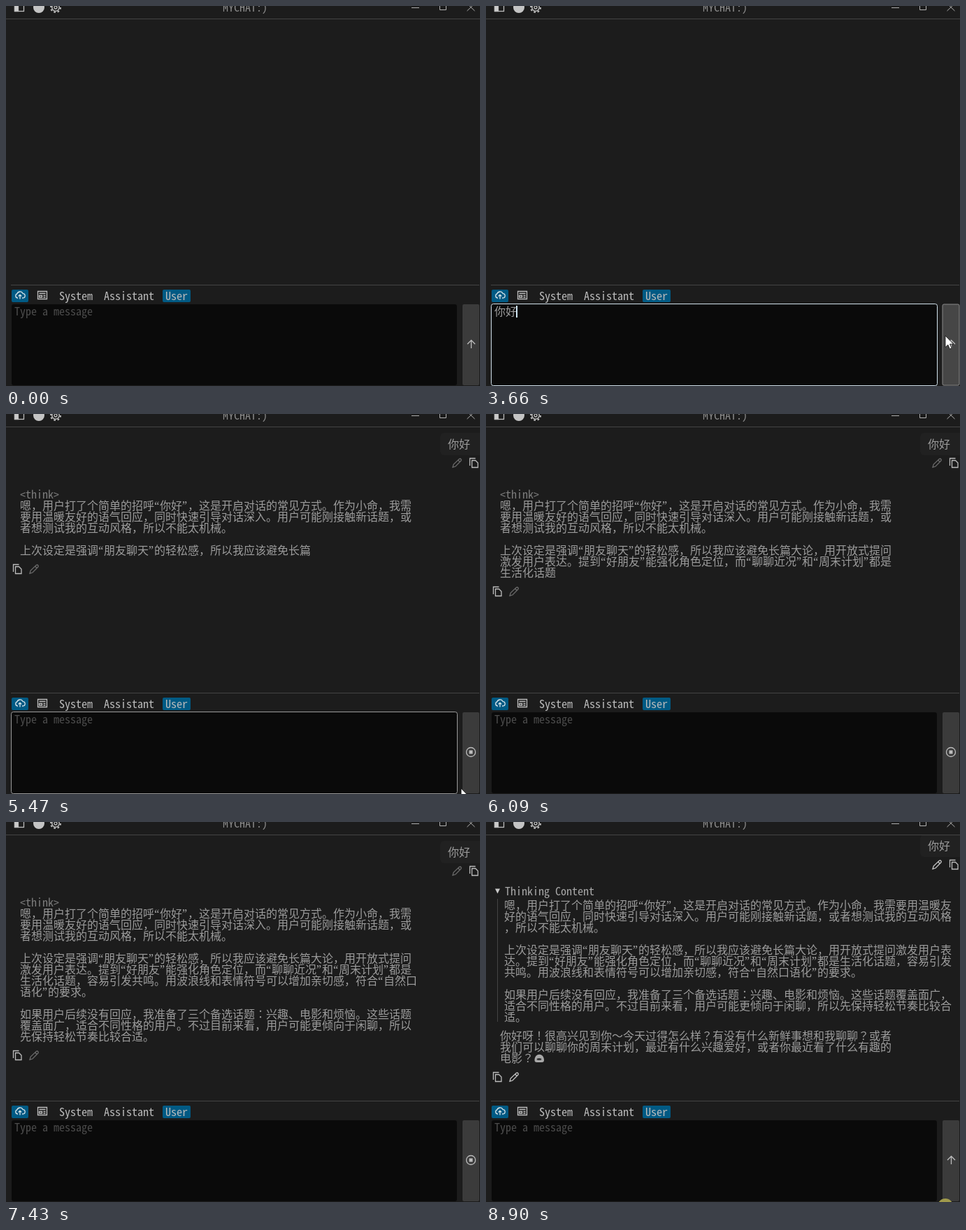
Recreate the animation shown at these times as an HTML page. Size 678 by 544 pixels, loop 8960 ms.

```html
<!DOCTYPE html>
<html lang="zh-CN">
<head>
<meta charset="utf-8">
<title>Chat</title>
<style>
  html, body { margin: 0; width: 100%; height: 100%; overflow: hidden; background: #1c1c1c; }
  svg { display: block; width: 678px; height: 544px; }
  text { white-space: pre; }
  .mono { font-family: "Noto Sans Mono CJK SC", "Noto Sans Mono", "DejaVu Sans Mono", monospace; }
  .han, .mid, .quote { font-size: 16px; font-weight: 300; fill: #9c9c9c; }
  .han { font-family: "Noto Sans CJK SC Light", "Noto Sans CJK SC DemiLight", "Noto Sans CJK SC", "Noto Sans CJK", sans-serif; }
  .mid { font-family: "Noto Sans CJK JP Light", "Noto Sans CJK JP DemiLight", "Noto Sans CJK JP", "Noto Sans CJK", sans-serif; }
  .quote { font-family: "Noto Serif", "Liberation Serif", serif; }
  .line { fill: none; stroke: #bdbdbd; stroke-width: 1.3; }
</style>
</head>
<body>
<svg viewBox="0 0 678 544" xmlns="http://www.w3.org/2000/svg">
  <defs>
    <clipPath id="pane"><rect y="19" width="678" height="380"/></clipPath>
    <g id="copy" class="line">
      <path d="M-2.5 -3.5H2.5L6 0V6.5H-2.5Z"/>
      <path d="M-5.5 4V-6.5H2.5"/>
    </g>
    <path id="pen" fill="none" stroke-width="1.3" d="M-6 6.2L-4.8 2L3.4 -5.7Q5 -6.5 6 -5.2Q6.8 -4 5.8 -3L-2 5ZM1.6 -4L4.3 -1.2"/>
  </defs>
  <rect width="678" height="544" fill="#1c1c1c"/>

  <g class="line">
    <rect x="12.5" y="-3.5" width="13" height="11"/>
    <rect x="12.5" y="-3.5" width="5" height="11" fill="#ccc"/>
    <circle cx="71" cy="2" r="5.2" stroke-width="1.5"/>
    <circle cx="71" cy="2" r="7" stroke-width="2" stroke-dasharray="2.7 2.8"/>
    <circle cx="71" cy="2" r="2"/>
    <path d="M580 2.5H591M620.5 -4V5.5H629.5V-4M659.5 -3.5L670.5 7M670.5 -3.5L659.5 7" stroke="#b0b0b0" stroke-width="1"/>
  </g>
  <circle cx="47" cy="2" r="8" fill="#c4c4c4"/>
  <text class="mono" x="310" y="8" fill="#8c8c8c">MYCHAT:)</text>
  <path d="M0 18.5H678M7 399.5H677" stroke="#444"/>

  <g clip-path="url(#pane)"><g id="chat"></g></g>

  <rect x="8" y="406" width="24" height="18" rx="2" fill="#005a84"/>
  <rect x="224" y="406" width="40" height="18" rx="2" fill="#005a84"/>
  <g class="line">
    <path stroke="#d8e4ea" d="M17 418H16.5A3.2 3.2 0 0 1 16 411.8A4.3 4.3 0 0 1 24 411.6A3.2 3.2 0 0 1 24 418H23M20 419.5V413.5M17.8 415.5L20 413.3L22.2 415.5"/>
    <path d="M45.5 408.5H58.5V419.5H45.5ZM47.5 411.5H56.5M47.5 414.5H51.5V417H47.5ZM53.5 414.5H56.5M53.5 417H56.5"/>
  </g>
  <g class="mono" fill="#bcbcbc">
    <text x="76" y="421">System</text>
    <text x="140" y="421">Assistant</text>
    <text x="228" y="421">User</text>
  </g>

  <rect x="8" y="427" width="637" height="116" rx="3" fill="#0a0a0a"/>
  <rect id="border" x="7.5" y="426.5" width="638" height="117" rx="3" fill="none"/>
  <rect id="popup" x="16" y="542" width="571" height="2" fill="#222"/>
  <text id="hint" class="mono" x="12" y="443" fill="#4c4c4c">Type a message</text>
  <rect id="mark" x="12" y="430" height="16" fill="#005a84"/>
  <text id="pinyin" class="mono" x="12" y="443" fill="#bcbcbc"></text>
  <text id="typed" class="han" x="12" y="443">你好</text>
  <rect id="caret" y="429" width="2" height="17" fill="#cfe6f5"/>

  <rect id="button" x="653" y="427" width="24" height="116" rx="2"/>
  <path id="send" class="line" d="M665.5 490V478.5M660 484L665.5 478.5L671 484"/>
  <g id="stop">
    <circle class="line" cx="665" cy="484" r="6.5"/>
    <rect x="662.5" y="481.5" width="5" height="5" fill="#bdbdbd"/>
  </g>

  <path id="beam" fill="none" stroke="#eee" d="M-3 -7.5H-1L0.5 -6.5L2 -7.5H4M0.5 -6.5V6.5M-3 7.5H-1L0.5 6.5L2 7.5H4"/>
  <path id="arrow" fill="#fff" stroke="#111" stroke-width=".8" d="M0 0V16.5L3.8 13L6.4 19L9 17.8L6.5 12H11.6Z"/>
  <circle id="halo" cx="657" cy="550" r="11" fill="#a09a4c"/>
</svg>
<script>
const LOOP = 8960;
const SENT = 3880, SPLIT = 7550, DONE = 8230;
const thought = [
  '嗯，用户打了个简单的招呼“你好”，这是开启对话的常见方式。作为小命，我需要用温暖友好的语气回应，同时快速引导对话深入。用户可能刚接触新话题，或者想测试我的互动风格，所以不能太机械。',
  '上次设定是强调“朋友聊天”的轻松感，所以我应该避免长篇大论，用开放式提问激发用户表达。提到“好朋友”能强化角色定位，而“聊聊近况”和“周末计划”都是生活化话题，容易引发共鸣。用波浪线和表情符号可以增加亲切感，符合“自然口语化”的要求。',
  '如果用户后续没有回应，我准备了三个备选话题：兴趣、电影和烦恼。这些话题覆盖面广，适合不同性格的用户。不过目前来看，用户可能更倾向于闲聊，所以先保持轻松节奏比较合适。'
].join('\n\n');
const answer = '你好呀！很高兴见到你～今天过得怎么样？有没有什么新鲜事想和我聊聊？或者我们可以聊聊你的周末计划，最近有什么兴趣爱好，或者你最近看了什么有趣的电影？';

const until = s => thought.indexOf(s) + s.length;
const thoughtPace = [[4060, 0], [5470, until('避免长篇')], [6720, until('准备了三个')], [7430, thought.length]];
const answerPace = [[SPLIT, 2], [DONE, answer.length + 1]];
const pinyin = [[2030, 'n'], [2210, 'ni'], [2280, "ni'h"], [2350, "ni'ha"], [2420, "ni'hao"]];
const path = [[80, 428, 556], [530, 435, 487], [2970, 435, 487], [3630, 657, 472],
              [5220, 657, 472], [5470, 651, 536], [5590, 650, 548]];

const $ = id => document.getElementById(id);
const show = (id, on) => $(id).setAttribute('visibility', on ? 'visible' : 'hidden');
const set = (id, attrs) => { for (const k in attrs) $(id).setAttribute(k, attrs[k]); };
const within = (t, a, b) => t >= a && t < b;

// Size the Latin face so that one cell is 8px wide.
const pen2d = document.createElement('canvas').getContext('2d');
const style = document.createElement('style');
pen2d.font = '16px ' + getComputedStyle($('hint')).fontFamily;
style.textContent = `.mono { font-size: ${128 / pen2d.measureText('M').width}px }`;
document.head.append(style);

// Text arrives in bursts every 30 ms.
function streamed(pace, t) {
  if (t < pace[0][0]) return 0;
  for (let i = 1; i < pace.length; i++) {
    const [t0, n0] = pace[i - 1], [t1, n1] = pace[i];
    if (t < t1) {
      const step = Math.floor((t - t0) / 30) * 30;
      return Math.floor(n0 + (n1 - n0) * step / (t1 - t0));
    }
  }
  return pace[pace.length - 1][1];
}

// Curly quotes take half a cell; some full-width marks sit in mid-cell.
const kindOf = ch => '“”'.includes(ch) ? 'quote' : '！？：'.includes(ch) ? 'mid' : 'han';

function wrap(text, max) {
  const lines = [[]];
  let col = 0;
  for (const ch of text) {
    const kind = kindOf(ch), w = kind === 'quote' ? 8 : 16;
    if (ch === '\n' || col + w > max) { lines.push([]); col = 0; }
    if (ch === '\n') continue;
    const line = lines[lines.length - 1], run = line[line.length - 1];
    if (run && run.kind === kind) run.s += ch;
    else line.push({ x: col, s: ch, kind });
    col += w;
  }
  return lines;
}

const label = (x, y, s, cls, fill) =>
  `<text class="${cls}" x="${x}" y="${y}"${fill ? ` fill="${fill}"` : ''}${cls === 'mid' ? ' lang="ja"' : ''}>${s}</text>`;

const block = (lines, x, y) => lines.map((line, i) =>
  line.map(r => label(x + r.x, y + i * 16, r.s, r.kind)).join('')).join('');

const icon = (id, x, y, color) => `<use href="#${id}" x="${x}" y="${y}" stroke="${color}"/>`;

const smile = (x, y) =>
  `<path d="M${x + 1.5} ${y - 3}C${x + 1.5} ${y - 14} ${x + 15} ${y - 14} ${x + 15} ${y - 3}Q${x + 15} ${y} ${x + 12} ${y}H${x + 4.5}Q${x + 1.5} ${y} ${x + 1.5} ${y - 3}Z" fill="#a8a8a8"/>` +
  `<ellipse cx="${x + 8}" cy="${y - 4.5}" rx="3.4" ry="1.5" fill="#333"/>`;

let lastKey = '';
function drawChat(t) {
  const split = t >= SPLIT, pen = t >= DONE ? '#c4c4c4' : '#6a6a6a';
  const n = streamed(split ? answerPace : thoughtPace, t);
  const key = [t >= SENT, t >= 4000, split, n, pen].join();
  if (key === lastKey) return;
  lastKey = key;
  if (t < SENT) { $('chat').innerHTML = ''; return; }

  let out = '<rect x="621" y="27" width="64" height="32" rx="6" fill="#212121"/>' +
    label(632, 49, '你好', 'han') + icon('pen', 645, 70, pen) + icon('copy', 669, 70, '#bdbdbd');
  let end = 121, scroll = 0;
  if (split) {
    const lines = wrap(answer.slice(0, n), 568);
    scroll = lines.length > 2 ? 9 : 0;
    end = 321 + (lines.length - 1) * 16;
    out += '<path d="M13 104.5H20L16.5 111.5Z" fill="#c8c8c8"/><path d="M16.5 119V295" stroke="#444"/>' +
      label(27, 114, 'Thinking Content', 'mono', '#a8a8a8') +
      block(wrap(thought, 640), 26, 134) + block(lines, 20, 321);
    if (n > answer.length) out += smile(68, end);
  } else if (t >= 4000) {
    const lines = wrap(thought.slice(0, n).trimEnd(), 568);
    if (n) end = 137 + (lines.length - 1) * 16;
    out += label(20, 121, '&lt;think&gt;', 'mono', '#7c7c7c') + block(lines, 20, 137);
  }
  out += icon('copy', 16, end + 21, '#bdbdbd') + icon('pen', 40, end + 21, pen);
  $('chat').innerHTML = out;
  set('chat', { transform: `translate(0 ${-scroll})` });
}

function pointer(t) {
  for (let i = 1; i < path.length; i++) {
    const [t0, x0, y0] = path[i - 1], [t1, x1, y1] = path[i];
    if (within(t, t0, t1)) {
      const p = (t - t0) / (t1 - t0), e = p * p * (3 - 2 * p);
      return [x0 + (x1 - x0) * e, y0 + (y1 - y0) * e];
    }
  }
  return null;
}

function draw(t) {
  drawChat(t);

  const at = pointer(t);
  const inText = at && at[0] < 647 && t < SENT;
  const hover = at && at[0] >= 652;
  show('beam', inText);
  show('arrow', at && !inText);
  if (at) set(inText ? 'beam' : 'arrow', { transform: `translate(${Math.round(at[0])} ${Math.round(at[1])})` });
  set('button', { fill: hover ? '#464646' : '#3b3b3b', stroke: hover ? '#888' : 'none' });

  const focus = within(t, 410, SENT);
  set('border', { stroke: focus ? '#d2e2ec' : within(t, 110, 5650) ? '#9a9a9a' : 'none' });

  const composing = within(t, 2030, 2590), typed = within(t, 2590, SENT);
  const keys = composing ? pinyin.filter(k => k[0] <= t).pop()[1] : '';
  $('pinyin').textContent = keys;
  set('mark', { width: keys.length * 8 });
  show('popup', composing);
  show('typed', typed);
  show('hint', !composing && !typed);
  set('caret', { x: typed ? 43 : keys ? 11 + keys.length * 8 : 11 });
  show('caret', focus && !within(t, 910, 1690) && !within(t, 3120, 3650));

  const busy = within(t, SENT, DONE);
  show('stop', busy);
  show('send', !busy);
  show('halo', t >= 8900);
}

const start = performance.now();
function tick() {
  draw((performance.now() - start) % LOOP);
  requestAnimationFrame(tick);
}
tick();
</script>
</body>
</html>
```
